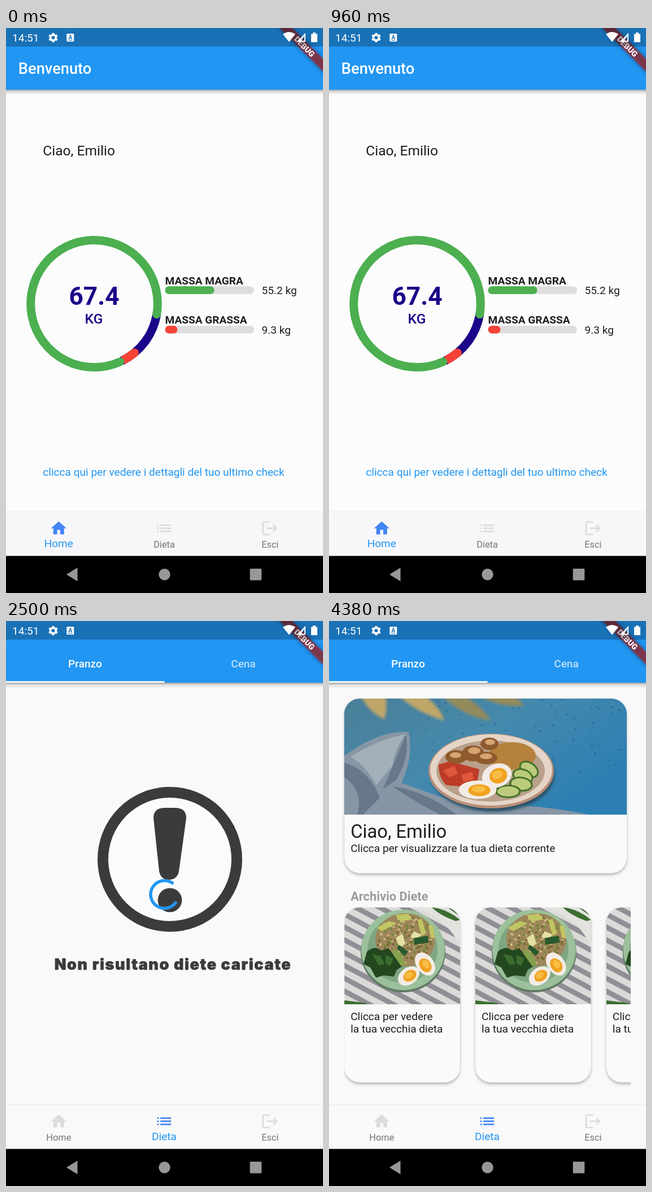
Recreate the animation shown at these times as an HTML page. Size 561 by 998 pixels, loop 4420 ms.

```html
<!DOCTYPE html>
<html lang="it">
<head>
<meta charset="utf-8">
<title>Dieta</title>
<style>
  html, body { margin: 0; width: 100%; height: 100%; overflow: hidden; background: #000; }
  svg { display: block; width: 100vw; height: 100vh; font: 19.09px Roboto, sans-serif; fill: #1d1d1f; }
  .b { font-weight: 700; }
  .m { font-weight: 500; }
  .mid { text-anchor: middle; }
  .card { fill: #fafaf9; filter: drop-shadow(0 3px 2.5px rgba(0,0,0,.27)); }
  .soft { filter: blur(2.5px); }
</style>
</head>
<body>
<svg viewBox="0 0 561 998">
  <defs>
    <linearGradient id="shade" x2="0" y2="1">
      <stop stop-color="#000" stop-opacity=".34"/><stop offset=".4" stop-color="#000" stop-opacity=".1"/>
      <stop offset="1" stop-color="#000" stop-opacity="0"/>
    </linearGradient>
    <linearGradient id="sea" x2="1" y2=".6">
      <stop stop-color="#4a7f98"/><stop offset=".5" stop-color="#4589ad"/><stop offset="1" stop-color="#2c7fb3"/>
    </linearGradient>
    <pattern id="stripes" width="20" height="20" patternUnits="userSpaceOnUse" patternTransform="rotate(28)">
      <path fill="#dcdad9" d="M0 0h20v20H0z"/><path fill="#8f8f95" d="M0 0h20v9H0z"/>
    </pattern>
    <clipPath id="list"><path d="M27.3 480H534V840H27.3z"/></clipPath>
    <clipPath id="bigTop"><path d="M27 342V164a27 27 0 0 1 27-27H500a27 27 0 0 1 27 27V342z"/></clipPath>
    <clipPath id="smallTop"><path d="M27 677V533a27 27 0 0 1 27-27H205a27 27 0 0 1 27 27V677z"/></clipPath>

    <g id="egg">
      <ellipse rx="22" ry="17" fill="#f3ece6"/><ellipse cx="2" cy="1" rx="13" ry="11" fill="#f0a21e"/>
      <ellipse cx="1" cy="-1" rx="8" ry="6" fill="#f8bd45"/>
    </g>
    <g id="slice"><ellipse rx="19" ry="13" fill="#44702a"/><ellipse rx="16" ry="10" fill="#bccb7c"/></g>

    <g id="salad" clip-path="url(#smallTop)">
      <path fill="url(#stripes)" d="M27 506H232V677H27z"/>
      <path fill="#e2e2de" d="M150 506h82v70q-20-50-82-70z"/>
      <path fill="#3c6e30" d="M182 506q26 2 50 22l-8 2q-28-10-42-24zM210 506l22 6v10zM27 670l40 5v3H27z"/>
      <ellipse cx="131" cy="585" rx="75" ry="71" fill="#5f7a64"/>
      <ellipse cx="131" cy="581" rx="74" ry="71" fill="#9cc09b"/>
      <ellipse cx="130" cy="580" rx="62" ry="59" fill="#7fa682"/>
      <ellipse cx="135" cy="563" rx="53" ry="47" fill="#9d8659"/>
      <g id="grain"></g>
      <path fill="#23471f" d="M67 584q14-12 25-2l14-4 8 12 14 4 2 16-10 6-5 12-18-2-14 4-10-18-12-6z"/>
      <path fill="#3c6d2f" d="M76 588l16 4 6 14-10 2zM100 590l14 6-6 14-8-6z"/>
      <path fill="#c1c563" d="M84 542l22-12 14 4-26 14zM118 519l22-2 8 10-22 4zM156 528l8-2 8 26-8 4zM176 537l8 2 4 22-8-2z"/>
      <path fill="#e4e0a4" d="M118 560l12-8 5 18-10 8zM150 548l14 6-8 8-12-4z"/>
      <path fill="#28592c" d="M150 560l24-4 3 12-26 4zM124 572l16 12-6 8-14-14z"/>
      <path fill="#86a14e" d="M112 578l14 8 10 20-8 4-14-20z"/>
      <use href="#egg" transform="translate(141 627) rotate(-35) scale(.95 .86)"/>
      <use href="#egg" transform="translate(170 606) rotate(55) scale(1.02 .9)"/>
    </g>
  </defs>

  <path id="bg" d="M0 0H561V998H0z"/>

  <g id="home">
    <text x="65.3" y="224.5" font-size="24.55">Ciao, Emilio</text>
    <g fill="none" stroke-width="15">
      <path id="navyArc" stroke="#1c0389"/>
      <path id="redArc" stroke="#f44336"/>
      <path id="redTip" stroke="#f44336" stroke-linecap="round"/>
      <path id="greenArc" stroke="#4caf50" stroke-linecap="round"/>
    </g>
    <g class="mid" fill="#1c0389">
      <text x="156" y="488.5" class="b" font-size="44.3">67.4</text>
      <text x="155.5" y="522" class="m" font-size="24.5">KG</text>
    </g>
    <text x="281.5" y="452.5" class="b">MASSA MAGRA</text>
    <text x="281.5" y="522" class="b">MASSA GRASSA</text>
    <g fill="#dedee1">
      <rect x="281.5" y="456.3" width="157.5" height="13.6" rx="6.8"/>
      <rect x="281.5" y="526" width="157.5" height="13.6" rx="6.8"/>
    </g>
    <rect x="281.5" y="456.3" width="87" height="13.6" rx="6.8" fill="#4caf50"/>
    <rect x="281.5" y="526" width="22" height="13.6" rx="6.8" fill="#f44336"/>
    <text x="452.5" y="469.5">55.2 kg</text>
    <text x="452.5" y="539.5">9.3 kg</text>
    <text x="65.3" y="791" fill="#2196f3">clicca qui per vedere i dettagli del tuo ultimo check</text>
  </g>

  <g id="empty">
    <circle cx="290" cy="421" r="118.5" fill="#fbfbfb" stroke="#3b3b3b" stroke-width="19"/>
    <path fill="#3b3b3b" d="M261 348Q261 330 281 330H299Q319 330 319 348L306 442Q303 457 288 457Q274 457 271 442z"/>
    <circle cx="290" cy="493" r="21.3" fill="#3b3b3b"/>
    <text x="295.5" y="616" class="mid" font-family="Inter, sans-serif" font-size="27" font-weight="900"
      letter-spacing="1.6" fill="#3b3b3b" stroke="#3b3b3b" stroke-width=".7">Non risultano diete caricate</text>
    <path id="spinner" fill="none" stroke="#2196f3" stroke-width="5.45" stroke-linecap="square"/>
  </g>

  <g id="diets">
    <rect id="bigCard" class="card" x="27.3" y="136.4" height="309" rx="27"/>
    <g class="photo" clip-path="url(#bigTop)">
      <path fill="url(#sea)" d="M27 137H527V342H27z"/>
      <g id="specks" fill="#235e80"></g>
      <g class="soft" fill="#bfa669">
        <path d="M56 132h44q4 24-2 42-30-16-42-42zM124 132h46q28 22 34 44-52-16-80-44z"/>
        <path fill="#938b5c" d="M200 132h40q36 24 46 44-50-8-86-44zM266 132h60q16 10 18 18-46 2-78-18z"/>
      </g>
      <path fill="#8696a5" d="M27 238Q90 192 141 196Q150 240 128 286Q200 312 250 328Q340 318 460 342H27z"/>
      <path fill="#a3b0ba" d="M38 240Q84 210 136 200Q118 222 112 256L84 290Q60 250 38 240z"/>
      <path fill="#66788a" d="M27 250Q70 262 90 312L60 342H50Q62 300 27 276zM136 200Q144 240 118 282L96 296Q116 250 136 200zM112 292Q170 300 226 342H196Q150 318 112 292z"/>
      <ellipse class="soft" cx="290" cy="272" rx="109" ry="65" fill="#2b5268"/>
      <ellipse cx="287" cy="265" rx="111" ry="66" fill="#b98f78"/>
      <ellipse cx="287" cy="263" rx="108" ry="63" fill="#e5d5c8"/>
      <ellipse cx="286" cy="265" rx="96" ry="54" fill="#b8a08a"/>
      <ellipse cx="324" cy="238" rx="42" ry="24" fill="#b5823d"/>
      <path fill="#bd3c27" d="M194 254l18-6 26 6 28 8-4 26-30 4-24-2q-14-12-14-36z"/>
      <path fill="#df573b" d="M202 264l20-8 6 14-16 6zM234 272l20-6 2 14-18 4z"/>
      <g fill="#8f5a2d">
        <ellipse cx="225" cy="240" rx="19" ry="12"/><ellipse cx="255" cy="234" rx="20" ry="14"/>
        <ellipse cx="284" cy="217" rx="16" ry="11"/><ellipse cx="278" cy="242" rx="20" ry="11"/>
      </g>
      <g fill="#d5a570">
        <ellipse cx="224" cy="237" rx="10" ry="5"/><ellipse cx="257" cy="229" rx="11" ry="6"/>
        <ellipse cx="285" cy="214" rx="9" ry="5"/><ellipse cx="278" cy="239" rx="11" ry="5"/>
      </g>
      <use href="#slice" transform="translate(354 262) rotate(35)"/>
      <use href="#slice" transform="translate(343 274) rotate(20)"/>
      <use href="#slice" transform="translate(340 288) rotate(8) scale(1.1 1)"/>
      <use href="#slice" transform="translate(317 301) scale(1.2 .9)"/>
      <use href="#egg" transform="translate(297 273) rotate(-20) scale(1.22)"/>
      <use href="#egg" transform="translate(263 298) scale(1.52 .96)"/>
    </g>
    <g id="bigText">
      <text x="38.2" y="178" font-size="32.73">Ciao, Emilio</text>
      <text x="38.2" y="203.4">Clicca per visualizzare la tua dieta corrente</text>
    </g>
    <text x="38.2" y="493.5" class="b" font-size="21.8" fill="#9b9b9b">Archivio Diete</text>
    <g id="archive" clip-path="url(#list)"></g>
  </g>

  <!-- app bar -->
  <path fill="url(#shade)" d="M0 109H561V119H0z"/>
  <path fill="#2196f3" d="M0 0H561V109H0z"/>
  <text id="title" x="21.8" y="81.3" class="m" font-size="27.27" fill="#fff">Benvenuto</text>
  <g id="tabs" class="m mid" fill="#fff">
    <text x="140" y="82">Pranzo</text>
    <text x="420" y="82" opacity=".7">Cena</text>
    <path d="M0 106.3H280.5V109H0z"/>
  </g>
  <g transform="translate(561 0) rotate(45)">
    <path fill="#b71c1c" fill-opacity=".63" style="filter:drop-shadow(0 0 4px rgba(0,0,0,.6))" d="M-60 38.2H60V54.5H-60z"/>
    <text y="51.3" class="mid" font-size="13.9" font-weight="900" fill="#fff">DEBUG</text>
  </g>

  <!-- status bar -->
  <path fill-opacity=".25" fill="#000" d="M0 0H561V32.7H0z"/>
  <g fill="#fff">
    <text x="11" y="24">14:51</text>
    <g id="gear" fill="none" stroke="#fff">
      <circle r="5.2" stroke-width="4"/>
      <circle r="7.2" stroke-width="3.2" pathLength="12" stroke-dasharray="1" transform="rotate(15)"/>
    </g>
    <rect x="107.3" y="10" width="13" height="14" rx="1.5"/>
    <text x="113.8" y="20" class="b mid" font-size="10" fill="#1971b5">A</text>
    <path fill="#1971b5" d="M110 21.2h7.6v1H110z"/>
    <path d="M501 24.5L490 11Q501 3 512 11z"/>
    <path d="M515 24.5L530 8.5V24.5zM522 22.5H528V14z" fill-rule="evenodd"/>
    <path d="M540 10.5H543V8H548V10.5H551V25H540z"/>
  </g>

  <!-- bottom bar -->
  <path id="navBg" d="M0 855H561V933H0z"/>
  <path fill="#000" fill-opacity=".035" d="M0 853.5H561V855.5H0z"/>
  <g id="nav" class="mid"></g>
  <path fill="#000" d="M0 932.5H561V998H0z"/>
  <g fill="#999897">
    <path d="M107 965.3L126.5 953.3V977.3z"/>
    <circle cx="280.5" cy="965.3" r="10.2"/>
    <rect x="431.7" y="955" width="20.6" height="20.6" rx="1.5"/>
  </g>
</svg>

<script>
const LOOP = 4420, OPEN = 1945, LOADED = 3000, PHOTOS = 4000;
const $ = id => document.getElementById(id);
const show = (el, on) => el.style.display = on ? '' : 'none';
const clamp = v => Math.min(1, Math.max(0, v));

let seed = 7;
const rand = () => (seed = seed * 16807 % 2147483647) / 2147483647;

// Arc from a to b, in degrees clockwise from the right
function arc(cx, cy, r, a, b) {
  const p = d => `${cx + r * Math.cos(d * Math.PI / 180)} ${cy + r * Math.sin(d * Math.PI / 180)}`;
  return `M${p(a)}A${r} ${r} 0 ${b - a > 180 ? 1 : 0} 1 ${p(b)}`;
}

// cubic-bezier(.4, 0, .2, 1)
function ease(x) {
  let lo = 0, hi = 1, s = .5;
  for (let i = 0; i < 20; i++) {
    s = (lo + hi) / 2;
    const bx = 1.2 * s * (1 - s) ** 2 + .6 * s * s * (1 - s) + s ** 3;
    if (bx < x) lo = s; else hi = s;
  }
  return 3 * s * s * (1 - s) + s ** 3;
}

function mix(a, b, k) {
  return `rgb(${a.map((v, i) => Math.round(v + (b[i] - v) * k))})`;
}

function spinnerPath(t) {
  const phase = t / 1333 % 1;
  const head = ease(clamp(phase * 2)), tail = ease(clamp(phase * 2 - 1));
  const start = -90 + tail * 270 + t / 2222 * 360 + phase * 90;
  return arc(280.5, 483, 24.5, start, start + Math.max(.1, (head - tail) * 270));
}

function ring(id, a, b) {
  $(id).setAttribute('d', arc(156, 487, 112.3, a, b));
}
ring('navyArc', 9, 64);
ring('redArc', 50, 63);
ring('redTip', 50.5, 56);
ring('greenArc', 66, 369.6);

for (let i = 0; i < 130; i++) {
  const x = 527 - 380 * rand() ** 1.3, y = 140 + 130 * rand() ** 1.5;
  $('specks').innerHTML += `<circle cx="${x}" cy="${y}" r="${.5 + 1.3 * rand()}" opacity=".7"/>`;
}
for (let i = 0; i < 150; i++) {
  const a = rand() * 6.28, r = Math.sqrt(rand());
  const tone = ['#cdb98a', '#76642f', '#6b8636'][i % 3];
  $('grain').innerHTML += `<circle cx="${135 + 50 * r * Math.cos(a)}" cy="${563 + 44 * r * Math.sin(a)}" r="2" fill="${tone}"/>`;
}

$('archive').innerHTML = [0, 1, 2].map(i => `<g transform="translate(${i * 231.8})">
  <rect class="card" x="27.3" y="505.5" width="204.5" height="309.5" rx="27"/>
  <use class="photo" href="#salad"/>
  <g class="note"><text x="38.2" y="534.2">Clicca per vedere</text>
  <text x="38.2" y="556.2">la tua vecchia dieta</text></g></g>`).join('');

const items = [
  ['Home', 93.3, 'M10 20v-6h4v6h5v-8h3L12 3 2 12h3v8z'],
  ['Dieta', 280, 'M3 13h2v-2H3zM3 17h2v-2H3zM3 9h2V7H3zM7 13h14v-2H7zM7 17h14v-2H7zM7 7v2h14V7z'],
  ['Esci', 467.3, 'M17 7l-1.41 1.41L18.17 11H8v2h10.17l-2.58 2.58L17 17l5-5zM4 5h8V3H4c-1.1 0-2 .9-2 2v14c0 1.1.9 2 2 2h8v-2H4z']
];
$('nav').innerHTML = items.map(([name, x, d]) =>
  `<g><path transform="translate(${x - 16.4} 867.3) scale(1.3636)" d="${d}"/><text x="${x}">${name}</text></g>`).join('');

function setItem(i, k) {
  const [icon, label] = $('nav').children[i].children;
  icon.setAttribute('fill', mix([220, 220, 222], [66, 133, 244], k));
  label.setAttribute('fill', mix([117, 117, 117], [33, 150, 243], k));
  label.setAttribute('font-size', 16.36 + 2.73 * k);
  label.setAttribute('y', 918 - k);
}

function draw(t) {
  const diet = t >= OPEN, loaded = t >= LOADED, photos = t >= PHOTOS;
  show($('home'), !diet);
  show($('title'), !diet);
  show($('tabs'), diet);
  show($('empty'), diet && !loaded);
  show($('diets'), loaded);
  $('bg').setAttribute('fill', diet ? '#f9f9f9' : '#fcfcfc');
  $('navBg').setAttribute('fill', diet ? '#f9f9f9' : '#f7f7f9');

  const k = ease(clamp((t - OPEN) / 200));
  setItem(0, 1 - k);
  setItem(1, k);
  setItem(2, 0);

  const dip = Math.max(0, 1 - Math.abs(t - 1880) / 200);
  $('gear').setAttribute('transform', `translate(83.5 17) scale(${.95 - .33 * dip})`);
  if (diet) $('spinner').setAttribute('d', spinnerPath(t - OPEN));

  $('bigCard').setAttribute('width', photos ? 499.5 : 373.6);
  $('bigText').setAttribute('transform', `translate(0 ${photos ? 205 : 0})`);
  document.querySelectorAll('.photo').forEach(el => show(el, photos));
  document.querySelectorAll('.note').forEach(el => el.setAttribute('transform', `translate(0 ${photos ? 171 : 0})`));
}

const begin = performance.now();
function tick() {
  draw((performance.now() - begin) % LOOP);
  requestAnimationFrame(tick);
}
tick();
</script>
</body>
</html>
```
